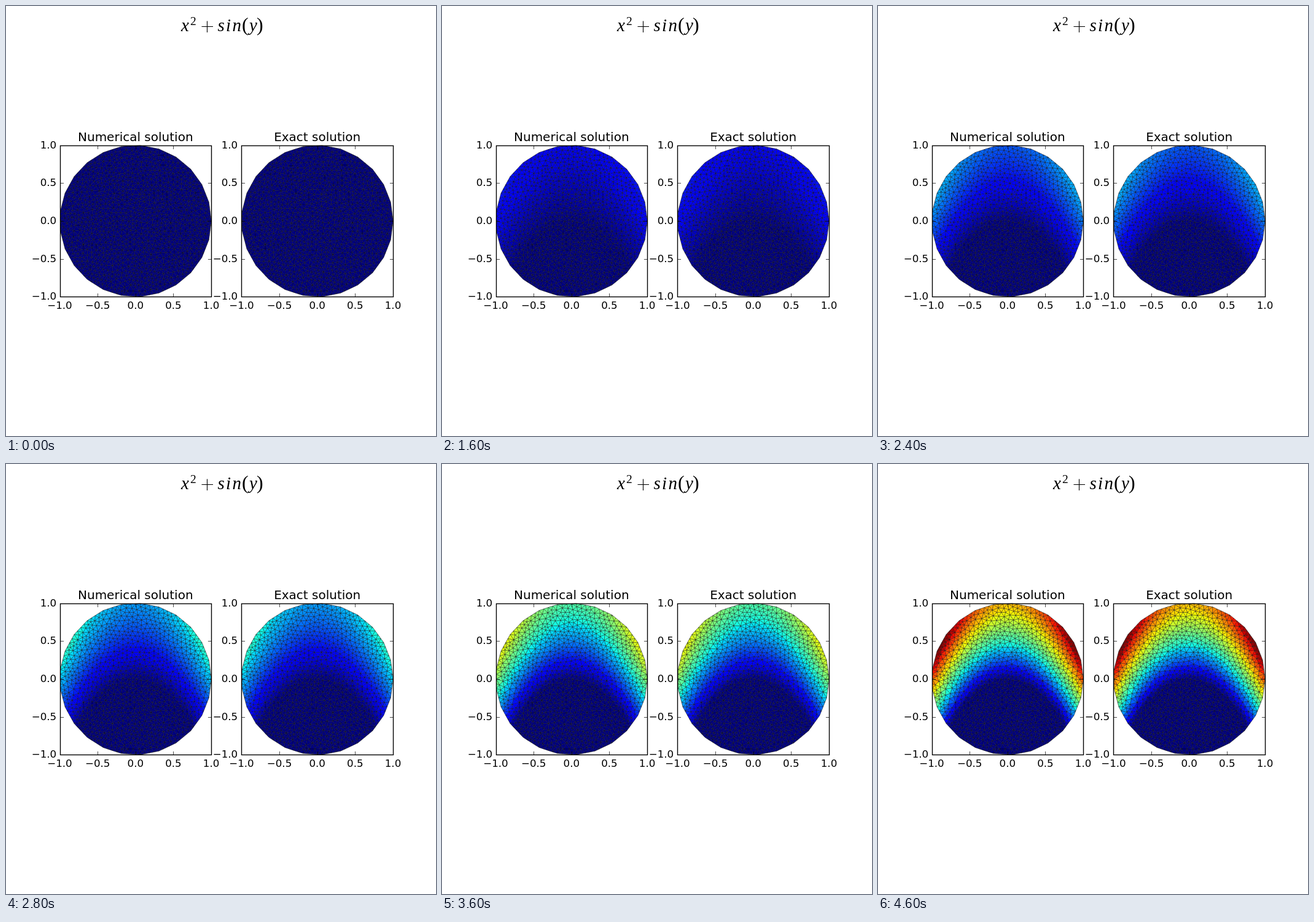
Write an HTML page with a canvas that moves like this. It is 700 px wide and 700 px high and loops after 4.8 s.

```html
<!DOCTYPE html>
<html lang="en">
<head>
<meta charset="utf-8">
<title>Numerical and exact solution</title>
<style>
  html, body { margin: 0; width: 100%; height: 100%; overflow: hidden; background: #fff; }
  canvas, svg { position: absolute; left: 0; top: 0; width: 700px; height: 700px; }
  text { font: 16.67px "DejaVu Sans", sans-serif; }
  .title { font-size: 20px; }
  .mid { text-anchor: middle; }
  .end { text-anchor: end; }
  .math text { font: italic 29px "Liberation Serif", serif; }
  .math .up { font-style: normal; font-size: 19.5px; }
  .math .paren { font-style: normal; font-size: 32px; }
  .frame { fill: none; stroke: #000; stroke-width: 1.39; }
  .ticks { fill: none; stroke: #000; stroke-width: 0.7; }
</style>
</head>
<body>
<canvas id="view" width="700" height="700"></canvas>
<svg id="axes" viewBox="0 0 700 700">
  <g class="math" aria-label="x^2 + sin(y)">
    <text x="285" y="41">x</text>
    <text class="up" x="300" y="31">2</text>
    <path d="M318.5 33.5H337M327.5 24.5V43" stroke="#000" stroke-width="1.1"/>
    <text x="344.5" y="41">s</text>
    <text x="358" y="41">i</text>
    <text x="368.5" y="41">n</text>
    <text class="paren" x="384" y="41">(</text>
    <text x="396" y="41">y</text>
    <text class="paren" x="408" y="41">)</text>
  </g>
</svg>
<script>
const LOOP = 4800, STEPS = 24;
const R = 123.3, CY = 350, SIDES = 25, SPLIT = 4;
const panels = [
  { title: "Numerical solution", cx: 210.8, left: 88.5, right: 334.5 },
  { title: "Exact solution", cx: 506.7, left: 383.5, right: 630.5 },
];

// ---- axes ----
const svg = document.getElementById("axes");

function add(tag, attrs, content = "") {
  const node = document.createElementNS("http://www.w3.org/2000/svg", tag);
  for (const key in attrs) node.setAttribute(key, attrs[key]);
  node.textContent = content;
  svg.appendChild(node);
}

function drawAxes({ title, cx, left, right }) {
  const top = 227.5, bottom = 473.5, len = 5.6;
  const snap = v => Math.floor(v + 0.5) + 0.5;
  let ticks = "";
  for (const v of [-1, -0.5, 0, 0.5, 1]) {
    const label = v.toFixed(1).replace("-", "\u2212");
    const x = cx + v * R, y = CY - v * R;
    add("text", { class: "mid", x, y: 493 }, label);
    add("text", { class: "end", x: left - 6.3, y: Math.round(y + 5) }, label);
    if (Math.abs(v) < 1) {
      ticks += `M${snap(x)} ${top}v${len}M${snap(x)} ${bottom}v${-len}`;
      ticks += `M${left} ${snap(y)}h${len}M${right} ${snap(y)}h${-len}`;
    }
  }
  add("path", { class: "ticks", d: ticks });
  add("rect", { class: "frame", x: left, y: top, width: right - left, height: bottom - top });
  add("text", { class: "title mid", x: cx, y: 220 }, title);
}
panels.forEach(drawAxes);

// ---- mesh ----
function seeded(seed) {
  return () => {
    seed = (seed + 0x6D2B79F5) | 0;
    let t = Math.imul(seed ^ (seed >>> 15), 1 | seed);
    t = (t + Math.imul(t ^ (t >>> 7), 61 | t)) ^ t;
    return ((t ^ (t >>> 14)) >>> 0) / 4294967296;
  };
}
const random = seeded(11);
const sector = 2 * Math.PI / SIDES;
const size = 2 * R * Math.sin(sector / 2) / SPLIT;

// Distance from a point to the nearest polygon side, positive inside.
function gap(x, y) {
  const a = Math.atan2(y, x);
  const off = a - (Math.floor(a / sector) + 0.5) * sector;
  return R * Math.cos(sector / 2) - Math.hypot(x, y) * Math.cos(off);
}

function rimPoints() {
  const pts = [];
  for (let i = 0; i < SIDES; i++) {
    const a = i * sector, b = a + sector;
    for (let j = 0; j < SPLIT; j++) {
      const f = j / SPLIT;
      // A tiny bulge keeps points on one side from being collinear.
      const k = R * (1 + 0.002 * f * (1 - f));
      pts.push({
        x: k * (Math.cos(a) * (1 - f) + Math.cos(b) * f),
        y: k * (Math.sin(a) * (1 - f) + Math.sin(b) * f),
        rim: true,
      });
    }
  }
  return pts;
}

function scatter(pts) {
  const min2 = (0.72 * size) ** 2;
  for (let i = 0; i < 30000; i++) {
    const x = (random() * 2 - 1) * R, y = (random() * 2 - 1) * R;
    if (gap(x, y) < 0.6 * size) continue;
    if (pts.every(p => (p.x - x) ** 2 + (p.y - y) ** 2 > min2)) pts.push({ x, y });
  }
  return pts;
}

function triangle(a, b, c) {
  const bx = b.x - a.x, by = b.y - a.y, cx = c.x - a.x, cy = c.y - a.y;
  const d = 2 * (bx * cy - by * cx), b2 = bx * bx + by * by, c2 = cx * cx + cy * cy;
  const ux = (cy * b2 - by * c2) / d, uy = (bx * c2 - cx * b2) / d;
  return { v: [a, b, c], x: a.x + ux, y: a.y + uy, r2: ux * ux + uy * uy, area: Math.abs(d) / 4 };
}

// Incremental Delaunay triangulation.
function delaunay(pts) {
  const far = 1e5;
  const outer = [{ x: -far, y: -far }, { x: far, y: -far * 0.9 }, { x: far * 0.07, y: far }];
  pts.forEach((p, i) => p.id = i);
  outer.forEach((p, i) => p.id = pts.length + i);
  const total = pts.length + 3;
  let tris = [triangle(...outer)];
  for (const p of pts) {
    const edges = new Map(), keep = [];
    for (const t of tris) {
      if ((t.x - p.x) ** 2 + (t.y - p.y) ** 2 >= t.r2) { keep.push(t); continue; }
      for (let i = 0; i < 3; i++) {
        const a = t.v[i], b = t.v[(i + 1) % 3];
        const key = Math.min(a.id, b.id) * total + Math.max(a.id, b.id);
        if (edges.has(key)) edges.delete(key);
        else edges.set(key, [a, b]);
      }
    }
    for (const [a, b] of edges.values()) keep.push(triangle(a, b, p));
    tris = keep;
  }
  return tris.filter(t => t.area > 1 && t.v.every(p => p.id < pts.length));
}

function relax(pts, tris) {
  for (const p of pts) p.sx = p.sy = p.n = 0;
  for (const { v } of tris) {
    for (const p of v) for (const q of v) {
      if (p !== q) { p.sx += q.x; p.sy += q.y; p.n++; }
    }
  }
  for (const p of pts) {
    if (!p.rim && p.n) { p.x = p.sx / p.n; p.y = p.sy / p.n; }
  }
}

const points = scatter(rimPoints());
for (let i = points.length - 1; i > 0; i--) {
  const j = Math.floor(random() * (i + 1));
  [points[i], points[j]] = [points[j], points[i]];
}
let mesh = delaunay(points);
for (let i = 0; i < 4; i++) {
  relax(points, mesh);
  mesh = delaunay(points);
}

// ---- field ----
const PEAK = 1.18;
const field = p => (p.x / R) ** 2 + Math.sin(p.y / R);
const wire = new Path2D();
for (const t of mesh) {
  const [a, b, c] = t.v;
  t.value = (field(a) + field(b) + field(c)) / 3 / PEAK;
  t.path = new Path2D(`M${a.x} ${-a.y}L${b.x} ${-b.y}L${c.x} ${-c.y}Z`);
  for (const [p, q] of [[a, b], [b, c], [c, a]]) {
    if (p.id < q.id || (p.rim && q.rim)) {
      wire.moveTo(p.x, -p.y);
      wire.lineTo(q.x, -q.y);
    }
  }
}

const clamp = v => Math.max(0, Math.min(1, v));
function jet(v) {
  v = clamp(v);
  const r = v < 0.89 ? clamp((v - 0.35) / 0.31) : 1 - (v - 0.89) / 0.22;
  const g = v < 0.5 ? clamp((v - 0.125) / 0.25) : clamp((0.91 - v) / 0.27);
  const b = v < 0.11 ? 0.5 + v / 0.22 : clamp((0.65 - v) / 0.31);
  return `rgb(${[r, g, b].map(c => Math.round(c * 255))})`;
}

const ctx = document.getElementById("view").getContext("2d");
function draw(step) {
  const gain = ((step + 1) / STEPS) ** 2;
  ctx.clearRect(0, 0, 700, 700);
  for (const { cx } of panels) {
    ctx.save();
    ctx.translate(cx, CY);
    for (const t of mesh) {
      ctx.fillStyle = jet(t.value * gain);
      ctx.fill(t.path);
    }
    ctx.lineWidth = 0.55;
    ctx.strokeStyle = "#000";
    ctx.stroke(wire);
    ctx.restore();
  }
}

const start = performance.now();
let shown = -1;
function tick() {
  const time = (performance.now() - start) % LOOP;
  const step = Math.floor(time / LOOP * STEPS);
  if (step !== shown) draw(shown = step);
  requestAnimationFrame(tick);
}
tick();
</script>
</body>
</html>
```
